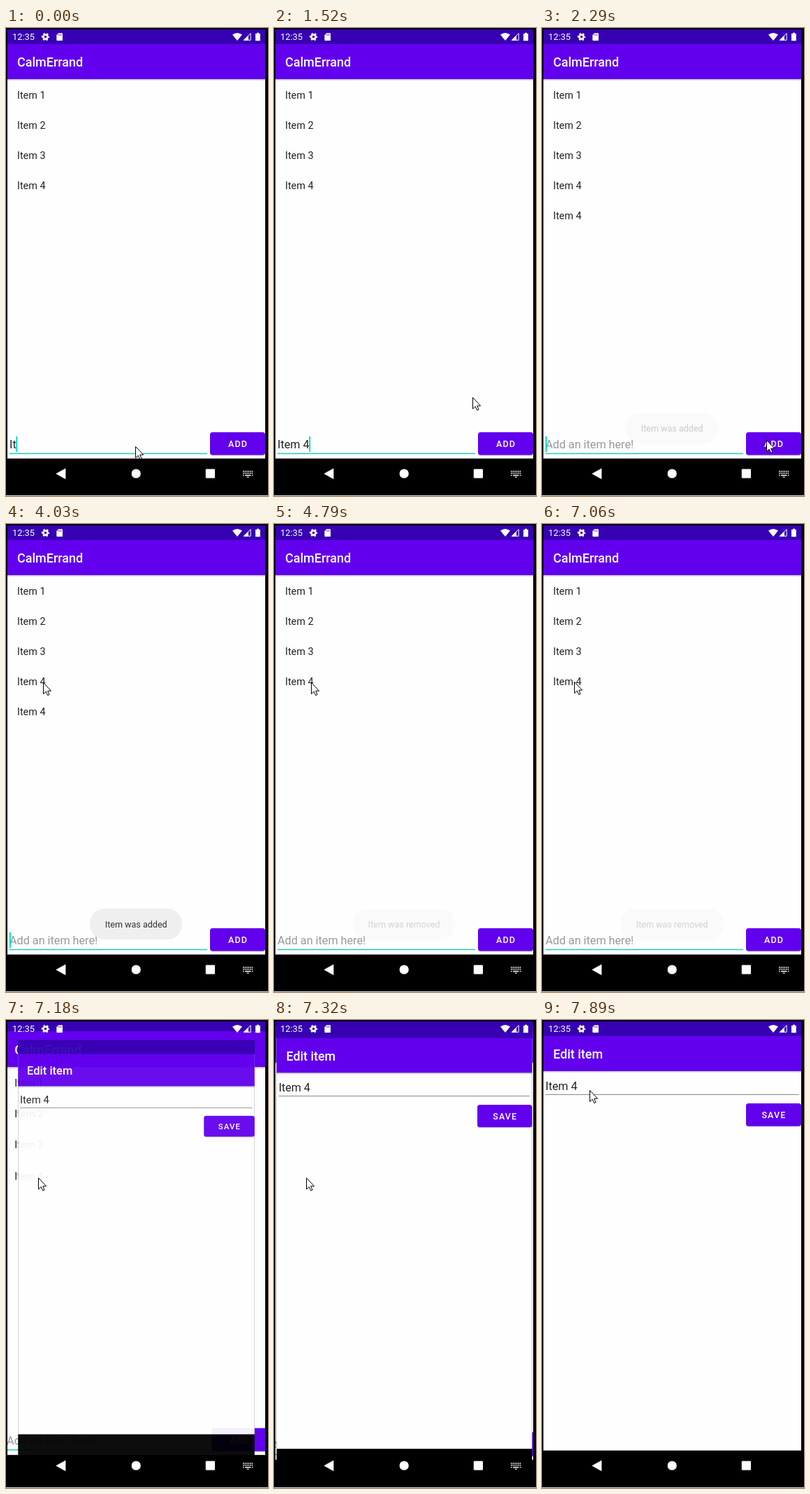
Animation, 375 px wide and 668 px high, one loop 8000 ms. Source, as an HTML page:

```html
<!DOCTYPE html>
<html lang="en">
<head>
<meta charset="utf-8">
<title>Todo list demo</title>
<style>
  html, body { margin: 0; width: 100%; height: 100%; overflow: hidden; background: #000; }
  svg { display: block; width: 375px; height: 668px; font-family: Roboto, sans-serif; }
  text { white-space: pre; }
  .title { font-size: 18px; font-weight: 500; fill: #fff; }
  .row { font-size: 14.4px; fill: #212121; }
  .field { font-size: 16.2px; fill: #212121; }
  .hint { font-size: 16.2px; fill: #999; }
  .label { font-size: 12.57px; font-weight: 500; letter-spacing: 1.12px; fill: #fff; text-anchor: middle; }
  .toast { font-size: 12.57px; fill: #333; text-anchor: middle; }
</style>
</head>
<body>
<svg viewBox="0 0 375 668">
  <defs>
    <clipPath id="screen"><rect x="2" y="2" width="369" height="665"/></clipPath>
    <linearGradient id="shade" x2="0" y2="1">
      <stop stop-color="#000" stop-opacity=".22"/>
      <stop offset="1" stop-color="#000" stop-opacity="0"/>
    </linearGradient>
    <g id="window">
      <rect x="2" y="2" width="369" height="665"/>
      <rect x="2" y="23" width="369" height="591.5" fill="#fefefe"/>
      <rect x="2" y="2" width="369" height="21.5" fill="#3700b3"/>
      <rect x="2" y="23" width="369" height="50" fill="#6200ee"/>
      <rect x="2" y="73" width="369" height="3" fill="url(#shade)"/>
    </g>
    <g id="button">
      <rect x="292" y="1.2" width="79" height="32.4" rx="3.6" fill="#000" opacity=".2"/>
      <rect x="292" width="79" height="32.4" rx="3.6" fill="#6200ee"/>
    </g>
  </defs>
  <rect width="375" height="668"/>
  <rect y="667" width="375" height="1" fill="#ddd"/>
  <g clip-path="url(#screen)">
    <g id="list">
      <use href="#window"/>
      <text class="title" x="16" y="55.3">CalmErrand</text>
      <g id="rows"></g>
      <rect x="5" y="606.7" width="283" height="1.5" fill="#1fcdbb"/>
      <text class="hint" id="hint" x="5" y="600.2">Add an item here!</text>
      <text class="field" id="typed" x="5" y="600.2"></text>
      <rect id="caret" y="583" width="1.9" height="22" fill="#03dac5"/>
      <use href="#button" y="577"/>
      <rect id="ripple" x="292" y="577" width="79" height="32.4" rx="3.6" fill="#fff"/>
      <text class="label" x="332" y="598">ADD</text>
    </g>
    <g id="edit">
      <use href="#window"/>
      <text class="title" x="16" y="55.3">Edit item</text>
      <text class="field" x="5" y="99.6">Item 4</text>
      <rect x="5" y="106" width="362.5" height="1" fill="#888"/>
      <use href="#button" y="119"/>
      <text class="label" x="332" y="140">SAVE</text>
    </g>
  </g>
  <g id="system" fill="#fff">
    <text x="9" y="17.4" font-size="12.8">12:35</text>
    <circle cx="56.5" cy="12.6" r="3.1" fill="none" stroke="#fff" stroke-width="2.6"/>
    <circle cx="56.5" cy="12.6" r="4.8" fill="none" stroke="#fff" stroke-width="1.8" stroke-dasharray="2.5 2.527" stroke-dashoffset="1.25"/>
    <path d="M75.3 7.2H80q1 0 1 1V17q0 1-1 1H73.3q-1 0-1-1V10.3Z"/>
    <path d="M75.4 8.8v2M77.3 8.8v2M79.2 8.8v2" stroke="#3700b3" stroke-width=".8"/>
    <path d="M324 9.6Q331 4.4 338 9.6L331 18Z"/>
    <path d="M350.2 7.6V17.3H340.4Z" fill="none" stroke="#fff"/>
    <path d="M347 10.6V17.5H339.8Z"/>
    <path d="M359 6.8h3v1.2h1.8V18.3H357V8h2Z"/>
    <path d="M85 629V643.4L72 636.2Z" stroke="#fff" stroke-width=".8" stroke-linejoin="round"/>
    <circle cx="186.2" cy="636" r="6.6"/>
    <rect x="285.8" y="629.4" width="13.2" height="13.2" rx="1"/>
    <g id="keys" stroke="#fff" stroke-width="1.5">
      <path d="M339 632.7H353.4M339 635.6H353.4" stroke-dasharray="1.6 .95"/>
      <path d="M339 638.5h1.6M342 638.5h8.4M351.8 638.5h1.6"/>
      <path d="M344 640.6h4.4L346.2 642Z" stroke="none"/>
    </g>
  </g>
  <g id="toast">
    <rect id="pill" y="549" height="44" rx="21" fill="#efefef"/>
    <text class="toast" id="note" x="186.2" y="576"></text>
  </g>
  <path id="mouse" d="M.5.5V16.6L4.2 13.2 6.7 18.6 9 17.6 6.7 12.2H11.6Z" fill="#fff" stroke="#000" stroke-linejoin="round"/>
</svg>
<script>
const LOOP = 8000, CLICK = 2040, REMOVE = 4670, OPEN = 7060, SETTLED = 7470;

const TICKS = [
  0, 120, 270, 390, 510, 1010, 1400, 1520, 1640, 1790,
  2040, 2160, 2290, 2420, 2540, 2670, 2910, 3030, 3150, 3270,
  3390, 3510, 3630, 3780, 3900, 4030, 4150, 4300, 4420, 4540,
  4670, 4790, 4910, 5050, 5180, 5440, 5820, 5940, 6070, 6220,
  6360, 6510, 6790, 6910, 7060, 7180, 7320, 7470, 7740, 7890
];

// Pointer path: time, x, y.
const PATH = [
  [0, 185, 597], [1010, 185, 597], [1400, 222, 562], [1520, 284, 527],
  [1640, 319, 566], [1790, 321, 588], [2670, 321, 588], [2910, 314, 552],
  [3270, 276, 356], [3510, 232, 214], [3630, 215, 220], [3780, 108, 220],
  [3900, 62, 223], [4030, 53, 226], [5440, 53, 226], [5820, 48, 236],
  [6070, 45, 235], [6220, 45, 231], [6360, 45, 229], [6510, 46, 225],
  [7470, 46, 225], [7740, 63, 151], [7890, 68, 100]
];

// Progress of the screen change.
const GROW = [[0, 0], [OPEN, 0], [7180, 0.45], [7320, 0.94], [SETTLED, 1]];

const $ = id => document.getElementById(id);
const clamp = v => Math.min(1, Math.max(0, v));
const set = (el, attrs) => { for (const k in attrs) el.setAttribute(k, attrs[k]); };
const show = (el, on) => set(el, { visibility: on ? "visible" : "hidden" });

function along(keys, t) {
  const i = keys.findIndex(k => k[0] > t);
  if (i < 0) return keys[keys.length - 1].slice(1);
  const a = keys[i - 1], b = keys[i], f = (t - a[0]) / (b[0] - a[0]);
  return a.slice(1).map((v, n) => v + (b[n + 1] - v) * f);
}

const rows = [1, 2, 3, 4, 4].map((n, i) => {
  const row = document.createElementNS("http://www.w3.org/2000/svg", "text");
  set(row, { class: "row", x: 16, y: 100.6 + 43.1 * i });
  row.textContent = "Item " + n;
  $("rows").append(row);
  return row;
});

function drawField(t) {
  const count = 2 + [120, 270, 390, 510].filter(k => t >= k).length;
  const text = t < CLICK ? "Item 4".slice(0, count) : "";
  $("typed").textContent = text;
  show($("hint"), !text);
  const width = text ? $("typed").getComputedTextLength() : 0;
  const since = Math.max(0, t - (t < CLICK ? 510 : 1940));
  set($("caret"), { x: 5 + Math.max(0, width - 0.4) });
  show($("caret"), t < OPEN && Math.floor(since / 500) % 2 === 0);
}

function drawToast(t) {
  const removed = t >= REMOVE;
  const age = t - (removed ? 4690 : 2170);
  $("note").textContent = removed ? "Item was removed" : "Item was added";
  set($("pill"), removed ? { x: 112.7, width: 147.3 } : { x: 120, width: 132 });
  set($("toast"), { opacity: Math.min(clamp(age / 480), clamp((2470 - age) / 480)) });
}

function zoom(el, s) {
  set(el, { transform: `translate(186.5 334) scale(${s}) translate(-186.5 -334)` });
}

function draw(t) {
  drawField(t);
  drawToast(t);
  show(rows[4], t >= CLICK && t < REMOVE);
  set($("ripple"), { opacity: t < CLICK ? 0 : 0.2 * clamp((2270 - t) / 230) });

  const [p] = along(GROW, t);
  zoom($("list"), 1 + 0.05 * p);
  zoom($("edit"), 0.85 + 0.15 * p);
  set($("edit"), { opacity: clamp((t - 7095) / 90) });
  show($("keys"), t < SETTLED);

  const [x, y] = along(PATH, t);
  set($("mouse"), { transform: `translate(${Math.round(x)} ${Math.round(y)})` });
}

let start, last;
function loop(now) {
  start ??= now;
  const t = (now - start) % LOOP;
  const tick = TICKS.filter(k => k <= t).pop() ?? 0;
  if (tick !== last) draw(last = tick);
  requestAnimationFrame(loop);
}
draw(0);
requestAnimationFrame(loop);
</script>
</body>
</html>
```
